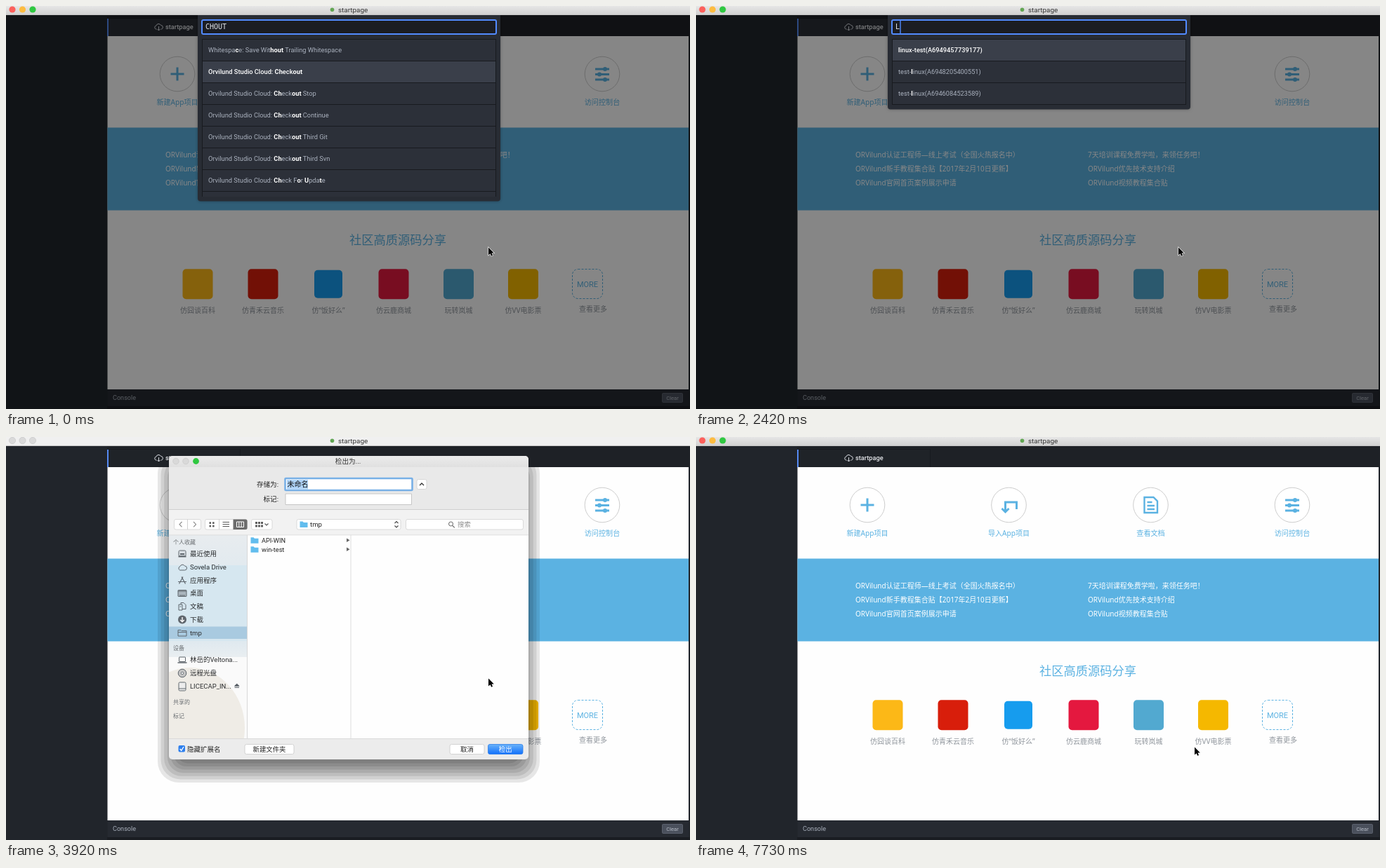
Recreate the animation shown at these times as an HTML page with a canvas. Size 974 px wide and 575 px high, loop 8 s.

```html
<!DOCTYPE html>
<html lang="zh-CN">
<head>
<meta charset="utf-8">
<title>startpage</title>
<style>
html, body { margin: 0; width: 100%; height: 100%; overflow: hidden; background: #21252b; }
canvas { display: block; width: 974px; height: 575px; }
</style>
</head>
<body>
<canvas id="stage"></canvas>
<script>
const W = 974, H = 575, LOOP = 8000;
const canvas = document.getElementById('stage');
const dpr = window.devicePixelRatio || 1;
canvas.width = W * dpr;
canvas.height = H * dpr;
const g = canvas.getContext('2d');

const CJK = '"Noto Sans CJK SC", "Noto Sans CJK JP", sans-serif';
const UI = 'Roboto, ' + CJK;
const PAGE = '"Noto Sans", ' + CJK;
const MONO = '"DejaVu Sans Mono", monospace';
const BLUE = '#5bb2e2';
const FOCUS = '#528bff';

// ---- helpers ----
function box(x, y, w, h, fill, r = 0, stroke, lw = 1) {
  g.beginPath();
  g.roundRect(x, y, w, h, r);
  if (fill) { g.fillStyle = fill; g.fill(); }
  if (stroke) { g.strokeStyle = stroke; g.lineWidth = lw; g.stroke(); }
}
function disc(x, y, r, fill, stroke, lw = 1) {
  g.beginPath();
  g.arc(x, y, r, 0, Math.PI * 2);
  if (fill) { g.fillStyle = fill; g.fill(); }
  if (stroke) { g.strokeStyle = stroke; g.lineWidth = lw; g.stroke(); }
}
function path(d, stroke, lw = 1, fill) {
  const p = new Path2D(d);
  if (stroke) { g.strokeStyle = stroke; g.lineWidth = lw; g.stroke(p); }
  if (fill) { g.fillStyle = fill; g.fill(p); }
}
function at(x, y, fn) {
  g.save();
  g.translate(x, y);
  fn();
  g.restore();
}
function clipped(x, y, w, h, fn) {
  g.save();
  g.beginPath();
  g.rect(x, y, w, h);
  g.clip();
  fn();
  g.restore();
}
function shade(y0, y1, a, b) {
  const s = g.createLinearGradient(0, y0, 0, y1);
  s.addColorStop(0, a);
  s.addColorStop(1, b);
  return s;
}
// y is the middle of the capitals
function text(s, x, y, size, color, { font = UI, weight = 400, align = 'left' } = {}) {
  g.font = `${weight} ${size}px ${font}`;
  g.fillStyle = color;
  g.textAlign = align;
  g.fillText(s, x, y + size * 0.36);
  return g.measureText(s).width;
}
const mid = { align: 'center' };
const pageMid = { font: PAGE, align: 'center' };

// ---- window and page ----
const cloud = 'M-3 3 H-4 A2.6 2.6 0 0 1 -3.6 -2 A3.6 3.6 0 0 1 3 -2.6 A2.9 2.9 0 0 1 4 3 H3';

function titleBar(active) {
  box(0, 0, W, 13, active ? shade(0, 13, '#e6e6e6', '#d0d0d0') : '#f0f0f0');
  box(0, 12, W, 1, '#c6c6c6');
  ['#fc605b', '#fdbc40', '#2fc840'].forEach((c, i) =>
    disc(9 + i * 14.5, 5, 4.6, active ? c : '#dadada', active ? null : '#c6c6c6', 0.7));
  disc(464.5, 5.3, 2.8, '#62a653');
  text('startpage', 473, 5.5, 9.9, '#333');
}

const actions = [
  [244, '新建App项目', () => path('M-9.5 0 H9.5 M0 -9.5 V9.5', BLUE, 3)],
  [445.5, '导入App项目', () => path('M11 6 V-4 H-5 V9 M-10 5 L-5 10 L0 5', BLUE, 3)],
  [647.5, '查看文档', () => path('M-9 -11 H4 L9.5 -5.5 V11 H-9 Z M-5 -4 H2 M-5 1 H5.5 M-5 6 H5.5', BLUE, 2.4)],
  [849, '访问控制台', () => {
    path('M-10 -7 H10 M-10 .5 H10 M-10 8 H10', BLUE, 3.2);
    [[4, -7], [-4, 0.5], [4, 8]].forEach(([x, y]) => disc(x, y, 3, BLUE));
  }],
];
const news = [
  [227, ['ORVilund认证工程师—线上考试（全国火热报名中）', 'ORVilund新手教程集合贴【2017年2月10日更新】', 'ORVilund官网首页案例展示申请']],
  [558, ['7天培训课程免费学啦，来领任务吧！', 'ORVilund优先技术支持介绍', 'ORVilund视频教程集合贴']],
];
const apps = [
  [273, 43, '#fcb817', '仿囧谈百科'],
  [366, 43, '#d81e0b', '仿青禾云音乐'],
  [459, 40, '#169cee', '仿“饭好么”'],
  [552, 43, '#e4183f', '仿云鹿商城'],
  [644.5, 43, '#52a9d0', '玩转岚城'],
  [736.5, 43, '#f5b800', '仿VV电影票'],
];

function page(tabLit) {
  box(0, 13, W, H, '#21252b');
  box(144, 13, W, 30, '#1e2126');
  box(144, 17, 190, 26, '#181a1f');
  box(146, 18, 187, 25, tabLit ? '#2a2e36' : '#1f2328');
  box(144, 18, 2, 25, '#568af2');
  at(217.5, 30, () => path(cloud + ' M0 -1 V5 M-2 3 L0 5 L2 3', '#d7dae0'));
  text('startpage', 227, 30, 9.2, '#e6e8ec', { weight: 500 });

  box(144.5, 43, 827.5, 504, '#fefefe');
  for (const [x, label, icon] of actions) {
    disc(x, 97, 24.8, '#fff', '#cdcdcd');
    at(x, 97, icon);
    text(label, x, 137, 10.1, BLUE, pageMid);
  }
  box(144.5, 173.5, 827.5, 118, BLUE);
  for (const [x, lines] of news)
    lines.forEach((s, i) => text(s, x, 212 + i * 20.2, 10, '#fff', { font: PAGE }));

  text('社区高质源码分享', 558, 333.5, 17.25, BLUE, pageMid);
  for (const [x, size, color, label] of apps) {
    box(x - size / 2, 396.7 - size / 2, size, size, color, 5);
    text(label, x, 434.5, 10, '#8f959c', pageMid);
  }
  g.setLineDash([3, 2]);
  box(806.5, 375.5, 43, 42, null, 8, BLUE);
  g.setLineDash([]);
  text('MORE', 828, 397, 11, BLUE, mid);
  text('查看更多', 836, 432.5, 10, '#8f959c', pageMid);

  box(144.5, 547, 827.5, 24, '#262a31');
  box(144, 571, W, 4, '#1a1d22');
  text('Console', 152, 559, 9.1, '#a9b0bc');
  box(934.5, 552.5, 29, 13, '#4a505c', 1, '#5b616d');
  text('Clear', 949, 559.3, 7.7, '#b4bac5', mid);
}

// ---- command palette; * toggles the matched letters ----
const brand = 'Orvilund Studio Cloud: ';
const commands = ['Whitespa*c*e: Save Wit*hout* Trailing Whitespace',
  ...['', ' Stop', ' Continue', ' Third Git', ' Third Svn'].map(s => brand + '*Ch*eck*out*' + s),
  brand + '*Ch*eck F*o*r *U*pda*t*e', ''];
const projects = ['linux-test(A6949457739177)', '1312312(A6949456635915)', '1111111(A6949455474219)',
  '1231321231(A6949455097372)', '1221(A6949455883440)', 'aaaa(A6949455543425)', 'XXXX(A6949343429803)', ''];
const matches = ['linux-test(A6949457739177)', 'test-linux(A6948205400551)', 'test-linux(A6946084523589)'];

function paletteRow(row, y, on) {
  box(280, y, 417, 30, on ? '#3a3f4a' : '#2c3039');
  let x = 288;
  row.split('*').forEach((part, k) => {
    const hit = k % 2;
    x += text(part, x, y + 15, 9.25, on || hit ? '#fff' : '#abb2bf', { weight: hit ? 700 : on ? 500 : 400 });
  });
}

function palette(query, rows, chosen, caret) {
  g.fillStyle = 'rgba(0,0,0,.475)';
  g.fillRect(0, 13, W, H);
  const bottom = rows.length < 8 ? 141 : 272;
  clipped(0, 13, W, H, () => {
    g.shadowColor = 'rgba(0,0,0,.3)';
    g.shadowBlur = 4 * dpr;
    box(273, 8, 431, bottom - 1.5, '#282c34', 4);
  });
  box(279, 20, 419, 20, '#1b1d23', 2, FOCUS, 2);
  text(query, 284, 29.7, 10, '#e3e6eb', { font: MONO });
  if (caret) box(284.3 + query.length * 6.02, 20.5, 1.4, 19.5, FOCUS);

  clipped(279, 47, 419, bottom - 47, () => {
    box(279, 47, 419, bottom - 47, '#181a1f');
    rows.forEach((row, i) => paletteRow(row, 48 + i * 31, i === chosen));
  });
}

// ---- save dialog ----
const INK = '#5f666d';
const folder = (x, y) => path(`M${x} ${y - 4} h4 l1.5 1.5 h5.5 v7 h-11 Z`, null, 0, '#62bdee');
const glyphs = {
  recent: () => { box(-5, -5, 10, 8, '#d9dfe4', 1.5, INK); path('M-5.5 3.5 H5.5 M-3 0 H3', INK, 2); },
  cloud: () => path('M-3.5 4 A3 3 0 0 1 -3 -1.5 A3.6 3.6 0 0 1 3.5 -2 A3 3 0 0 1 3.5 4 Z', INK),
  apps: () => path('M-4.5 5 L1 -5 M4.5 5 L-1 -5 M-6 2 H6', INK, 1.2),
  desk: () => { box(-6, -4.5, 12, 9, '#aab5bd', 0.5, INK); path('M-6 -3 H6 M-4 3 H4', INK); },
  docs: () => path('M-5 -3 H0 V5 H-5 Z M-2 -3 V-5.5 H2 L5 -2.5 V3.5 H0 M-3.5 0 H-1.5', INK),
  down: () => { disc(0, 0, 6, INK); path('M0 -3.5 V3 M-2.8 .5 L0 3.3 L2.8 .5', '#fff', 1.4); },
  folder: () => path('M-6 -4 H-2 L-1 -3 H6 V4.5 H-6 Z M-6 -1 H6', INK),
  laptop: () => { box(-4.5, -4, 9, 6.5, null, 0.5, INK); path('M-6.5 4 H6.5', INK, 1.5); },
  disc: () => { disc(0, 0, 5.8, '#c3c3c3', INK); disc(0, 0, 1.7, '#f4f4f4', INK, 0.8); },
  drive: () => { box(-5, -6, 10, 12, '#ececec', 1.5, INK); path('M-5 3 H5', INK); },
};
const places = [
  ['recent', '最近使用', 167], ['cloud', 'Sovela Drive', 186], ['apps', '应用程序', 204.5],
  ['desk', '桌面', 223], ['docs', '文稿', 242], ['down', '下载', 260.5], ['folder', 'tmp', 279.5],
  ['laptop', '林岳的Veltona...', 318], ['disc', '远程光盘', 337], ['drive', 'LICECAP_IN...', 356],
];
const heads = [['个人收藏', 150.5], ['设备', 301.5], ['共享的', 378], ['标记', 398]];

function button(x, w, label, fill = '#fff', color = '#222') {
  box(x, 438.5, w, 14, fill, 2.5, fill === '#fff' ? '#c9c9c9' : '#2f7fe8', 0.8);
  text(label, x + w / 2, 445.3, 9.4, color, mid);
}

function sideBar() {
  clipped(232, 140, 111.5, 290, () => {
    box(232, 140, 112, 290, '#fafafa');
    box(232, 140, 112, 43, shade(140, 183, '#e8ecef', '#e2eaef'));
    box(232, 183, 112, 108, '#d6e7f0');
    box(232, 291, 112, 23, shade(291, 314, '#dfe9ef', '#e9eef1'));
    g.fillStyle = '#efece6';
    g.beginPath();
    g.ellipse(262, 415, 78, 86, 0, 0, 7);
    g.fill();
    box(232, 270.5, 112, 17.5, '#a9cae0');
  });
  heads.forEach(([s, y]) => text(s, 238, y, 8, '#6a6e72', { weight: 500 }));
  for (const [icon, label, y] of places) {
    at(251, y, glyphs[icon]);
    text(label, 262, y, 9.5, '#2a2c2e');
  }
  path('M325.5 355.5 L328.7 352 L332 355.5 Z M325.5 357.5 H332', INK, 1, INK);
}

function dots(x, y, cols, gap, size) {
  for (let i = 0; i < cols * 2; i++)
    box(x + (i % cols) * gap, y + Math.floor(i / cols) * 4.5, size, size, '#5c5c5c');
}

function toolBar() {
  const edge = '#d2d2d2';
  [[239.5, 38], [283.5, 60], [349.5, 29.5], [414, 148], [569.5, 167]].forEach(([x, w]) =>
    box(x, 117.5, w, 14.5, '#fff', 2.5, edge, 0.8));
  box(323.5, 117.5, 20, 14.5, '#6c6c6c', [0, 2.5, 2.5, 0]);
  path('M258.5 117.5 V132 M303.5 117.5 V132', edge);
  path('M250.5 121 L247 124.7 L250.5 128.4 M267 121 L270.5 124.7 L267 128.4', '#8a8a8a', 1.1);
  dots(289.5, 121.3, 2, 4.5, 2.6);
  path('M308.5 121.5 H318 M308.5 124.5 H318 M308.5 127.5 H318', '#555');
  box(328.5, 121, 10, 7.5, null, 0, '#fff');
  path('M331.8 121 V128.5 M335.2 121 V128.5', '#fff');
  dots(355, 121, 3, 4, 3);
  path('M368.5 123.5 L371 126 L373.5 123.5', '#555', 1.1);
  folder(418.5, 124.5);
  text('tmp', 433, 125, 9.6, '#222');
  path('M553.5 123 L556 120.5 L558.5 123 M553.5 126.5 L556 129 L558.5 126.5', '#444', 1.1);
  disc(633.5, 124, 3, null, '#666');
  path('M635.7 126.3 L638.8 129.4', '#666', 1.2);
  text('搜索', 643, 125, 9.4, '#8c8c8c');
}

function dialog({ name, caret, checked, pressed }) {
  clipped(0, 43, W, H, () => {
    for (let i = 0; i < 7; i++) {
      const d = i * 4.6;
      box(216 + d, 22 + d, 544 - 2 * d, 471 - 2 * d, 'rgba(0,0,0,.095)', 30 - i * 2.5);
    }
  });
  box(232, 27, 512, 433, '#ececec', 5);
  box(232, 27, 512, 16, shade(27, 43, '#ebebeb', '#e0e0e0'), [5, 5, 0, 0]);
  box(232, 43, 512, 60, '#e9e9e9');
  box(232, 103, 512, 1, '#d0d0d0');
  box(232, 104, 512, 36, '#f2f2f2');
  [242, 256].forEach(x => disc(x, 34.5, 4.3, '#d9d9d9', '#c8c8c8', 0.7));
  disc(270.5, 34.5, 4.4, '#2fc840');
  text('检出为...', 487, 35, 9.6, '#333', mid);

  text('存储为:', 388, 67.7, 9.6, '#222', { align: 'right' });
  text('标记:', 388, 89, 9.6, '#222', { align: 'right' });
  box(397.5, 59, 181, 17, '#fff', 1, '#78b0e6', 2.6);
  box(398, 81, 179.5, 15.5, '#fff', 0, '#c6c6c6');
  if (!name) box(400, 61, 30, 13.5, '#afd3f8');
  const w = text(name || '未命名', 400.5, 67.8, 10, '#111');
  if (caret) box(400.7 + w, 61.5, 1, 12.5, '#111');
  box(585, 60.5, 14, 14, '#fff', 2.5, '#cfcfcf', 0.8);
  path('M589 69 L592 66 L595 69', '#333', 1.3);

  toolBar();
  box(232, 139.5, 512, 290.5, '#fefefe');
  sideBar();
  box(343, 140, 1, 290, '#d8d8d8');
  box(490.5, 140, 1, 290, '#dedede');
  box(232, 139.5, 512, 0.8, '#d4d4d4');
  box(232, 430, 512, 0.8, '#d4d4d4');
  ['API-WIN', 'win-test'].forEach((s, i) => {
    const y = 147.3 + i * 13;
    folder(348.5, y);
    text(s, 364, y, 9.2, '#222');
    path(`M485 ${y - 2.7} l4.5 2.7 l-4.5 2.7 Z`, null, 0, '#666');
  });

  if (checked) {
    box(245.5, 440, 9.5, 9.5, '#2f80ee', 2);
    path('M247.7 445 L249.7 447.3 L253 442', '#fff', 1.3);
  } else box(245.7, 440.2, 9, 9, '#fff', 2, '#cbcbcb', 0.8);
  text('隐藏扩展名', 258, 445.2, 9.5, '#222');
  button(340, 70, '新建文件夹');
  button(632, 49, '取消');
  button(686.5, 49.5, '检出', pressed ? shade(438, 453, '#4a90e4', '#0a55cc') : shade(438, 453, '#6cb5fa', '#0f6efb'), '#fff');
}

// ---- timeline ----
function step(list, t) {
  let v = list[0][1];
  for (const [from, value] of list) if (t >= from) v = value;
  return v;
}
const pointer = [[0, [687, 345]], [4280, [648, 299]], [4460, [679.5, 345]],
  [6830, [747.5, 445]], [7130, [730, 445]], [7280, [710, 443]]];
const typing = [[0, 0], [5360, 1], [5510, 2], [5660, 3], [5800, 4], [5950, 6], [6100, 7], [6250, 8], [6390, 9], [6690, 10]];
const blink = [[0, false], [830, true], [1310, false], [1670, true], [2120, false], [2420, true], [3320, false]];
const arrow = 'M.5 0 V11 L3 8.8 L4.7 12.3 L6.5 11.5 L5 8 H8.3 Z';

function draw(t) {
  g.setTransform(dpr, 0, 0, dpr, 0, 0);
  page(t < 3920);

  if (t < 470) {
    palette('CHOUT', commands, 1, t >= 150);
  } else if (t >= 620 && t < 3470) {
    const n = t < 2420 ? 0 : Math.min(4, 1 + Math.floor((t - 2420) / 150));
    const query = 'LINU'.slice(0, n);
    const key = query.toLowerCase();
    palette(query, n ? matches.map(s => s.replace(key, `*${key}*`)) : projects, 0, step(blink, t));
  } else if (t >= 3920 && t < 7580) {
    const n = step(typing, t);
    dialog({
      name: 'linux-test'.slice(0, n),
      caret: n > 0 && t < 7130,
      checked: n === 0,
      pressed: t >= 7280,
    });
  }
  titleBar(t < 3920 || t >= 7730);

  const [x, y] = step(pointer, t);
  at(x - 0.5, y - 0.5, () => path(arrow, '#fff', 1.2, '#000'));
}

const start = performance.now();
function tick(now) {
  draw(Math.max(0, now - start) % LOOP);
  requestAnimationFrame(tick);
}
draw(0);
requestAnimationFrame(tick);
</script>
</body>
</html>
```
